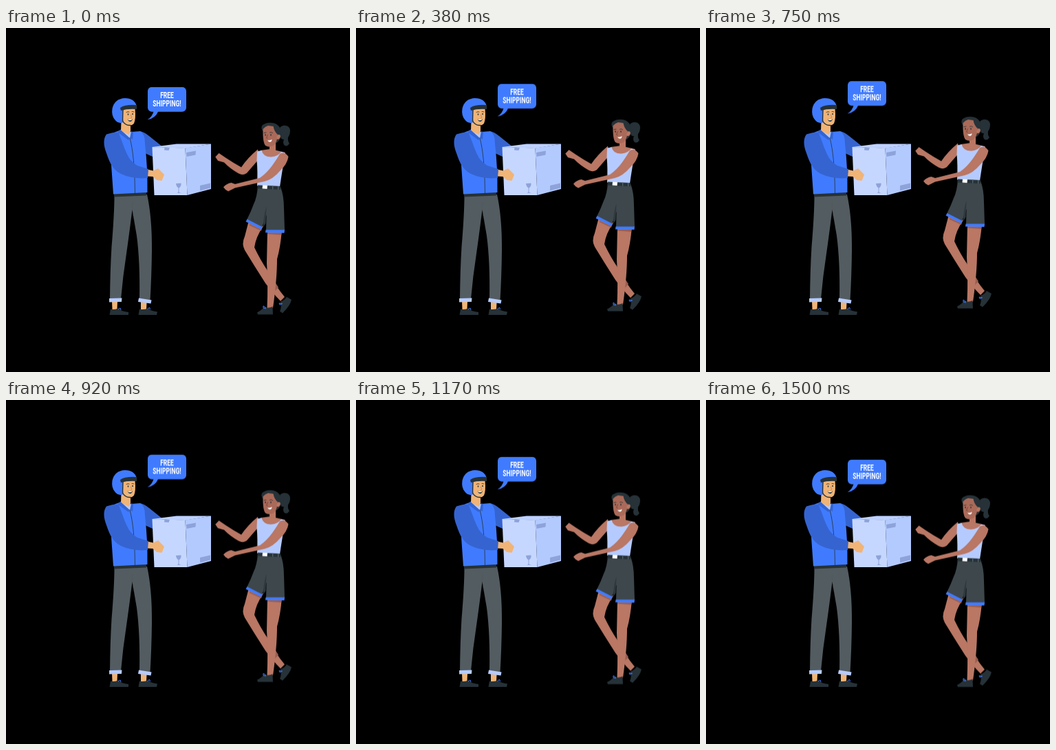
Animation, 500 px wide and 500 px high, one loop 1.54 s. Source, as an HTML page:

```html
<!DOCTYPE html>
<html lang="en">
<head>
<meta charset="utf-8">
<title>Free shipping</title>
<style>
  html, body { margin: 0; width: 100%; height: 100%; overflow: hidden; background: #000; }
  svg { display: block; width: 100vw; height: 100vh; }
  .float { animation: float 1540ms linear -49ms infinite; }
  @keyframes float {
    0%, 100% { transform: translateY(.7px); }
    50% { transform: translateY(-9.3px); }
  }
  .blue { fill: #407bff; }
  .navy { fill: #3564d1; }
  .dark { fill: #263238; }
  .pale { fill: #b5cbff; }
  .skin { fill: #f0b477; }
  .brown { fill: #b97764; }
  .face { fill: #aa6a59; }
  .shade { fill: #9a5e50; }
  .mark { fill: #8ea3da; }
  .line { fill: none; stroke: #263238; stroke-linecap: round; stroke-linejoin: round; }
  .lace { fill: none; stroke: #407bff; stroke-width: 1; }
  text { font: 700 12px Roboto, "Liberation Sans", sans-serif; fill: #fff; text-anchor: middle; }
</style>
</head>
<body>
<svg viewBox="0 0 500 500">
  <g id="courier">
    <!-- legs -->
    <path class="skin" d="M154 397h8l-.5 12h-7zM196 398l8.500 1-.5 10h-8z"/>
    <path fill="#535c61" d="M157.500 244L205 242C209.500 262 212.500 290 212 325Q211.500 362 209.500 396L194 393Q195 340 190 302L183.500 264Q179 300 175 328Q170 360 167 394L151 394Q151.500 350 153.500 318Q157.500 270 157.500 244Z"/>
    <path fill="#454d52" d="M183 251Q182.500 265 186 279L190 302L183.500 264Z"/>
    <path class="pale" d="M150 393L168.500 392.500 168 398 150 398.500ZM193 392.500L211.500 395.500 210.500 400.500 192 398Z"/>
    <path class="dark" d="M152 408.500Q157 410 163 407.500Q168 412 178 413V417H150.500ZM194 408.500Q200 410 206 407.500Q211 411.500 220 412.500L219 417H192.500Z"/>
    <path class="lace" d="M163 409l3-2 1 3M205.500 409l3-3 1 3"/>
    <path class="dark" d="M157 240L204 239V243.500L157 245.500Z"/>
    <!-- jacket -->
    <path class="navy" d="M194 150Q201 151 208 157L228 173 213 187 202 182Z"/>
    <path class="blue" d="M154 153L166 148.500 182 151 195 150Q202 153 202 168Q206 204 205.500 239L156 241.500Q153 199 151 170Z"/>
    <path class="pale" d="M166 149L182 151.500 183 154 180 161Z"/>
    <path class="skin" d="M167.500 136L181 141 181 150 179 155 167 149.500Z"/>
    <path class="navy" d="M166 147.500L180 160 178 163 162.500 151.500ZM182 150L185 151.500 184 162 180 160Z"/>
    <path class="line" stroke-width=".8" d="M180 160Q187 185 187.500 240"/>
  </g>

  <g id="helmet">
    <path class="skin" d="M168 117L187.500 117Q189 132 186 138.500Q182 143.500 174 141L168 136Z"/>
    <path class="blue" d="M171 137Q163 140 158 133Q153 127 154.500 117Q158 102.500 173 102Q187 102 190 114L171 118Q168 126 171 137Z"/>
    <path class="dark" d="M166 116Q173 111 189 112Q191 114 190 118Q177 117 167 120Z"/>
    <path class="line" stroke-width="1.400" d="M170 119L169.500 135Q173 142 181 141.500"/>
    <g class="dark"><ellipse cx="177.500" cy="125.500" rx=".8" ry="1.300"/><ellipse cx="184" cy="125" rx=".8" ry="1.300"/></g>
    <path class="line" stroke-width=".8" d="M175 122.500q2-1.500 4-.5M183 121.500q2-.5 3 .5"/>
    <path fill="none" stroke="#d58745" stroke-width=".9" d="M181 125.500l2 4.500-2 .5"/>
    <path class="dark" d="M176.500 132.500Q180 133.500 184 132Q183 136.300 180 136Q177.500 135.500 176.500 132.500Z"/>
    <path fill="#fff" d="M177 132.700Q180 133.500 183.500 132.300L183 133.500Q180 134.700 177.500 133.700Z"/>
  </g>

  <g id="box">
    <path fill="#bdd1ff" d="M212.500 173L248 168.500 298 168.500 260.500 175Z"/>
    <path fill="#c6d7ff" d="M212.500 173L260.500 174.500 263.500 243 215.500 243Z"/>
    <path fill="#b3caff" d="M260.500 174.500L298 168.500V234L263.500 243Z"/>
    <path class="mark" d="M230.500 173.500L238 173.700 236.500 178 230 177.500ZM262 181L276 178.500 275.500 184.500 262.500 187ZM282 229L297 225.500V232.500L282 236.500Z"/>
    <path class="mark" d="M247 226L254.500 225.500Q255 230 251.500 232.500V238.500L254.500 239.500 249 240 250.500 238V232.500Q247.500 230.500 247 226Z"/>
  </g>

  <g id="sleeve">
    <path class="skin" d="M205 205.500L214 207.500 221 204 230 213 226.500 222 219 221 213.500 216 205 215.500Z"/>
    <path class="navy" d="M146 154.500Q156 151 163.500 152C167.500 160 172 177 179 189Q184 196 191 200L207 205 206 218Q184 220 167 212C153 205 149 190 146 182Q139 164 146 154.500Z"/>
  </g>

  <g id="bubble" class="float">
    <rect class="blue" x="206" y="86" width="56" height="36" rx="6"/>
    <path class="blue" d="M215 120Q213 129 205.500 133.500Q217 132 221.500 121Z"/>
    <g transform="translate(234 0) scale(.71 1)">
      <text y="102.200">FREE</text>
      <text y="114.400">SHIPPING!</text>
    </g>
  </g>

  <g id="customer" class="float">
    <!-- back arm -->
    <path class="brown" d="M304.300 187.500L309.500 182 319 188.500Q331 196.500 342 202.500Q351 189 366 176.500L369 189Q356 204 350 211Q345 215 338 211.500Q325 204 317 195.500L308 193Z"/>
    <!-- legs -->
    <path class="brown" d="M353 280L374 288Q363 304 361 319Q370 338 381 354Q393 377 405 391L399 397Q388 386 377 371Q361 346 347 323Q342 314 347 303Z"/>
    <path class="shade" d="M354 285L371.500 293 371 295 354 287ZM390 368L396 377 389.500 384 388 383Z"/>
    <path class="brown" d="M380 294L401 294Q399 318 394 336Q394 365 388 407L379.500 407Q381 373 379 342Z"/>
    <path class="shade" d="M380 298H400.500L400 301 380 299.500Z"/>
    <path class="dark" d="M365 413.500Q372 410 375 405.500Q381 408 387.500 405L388 416.500H366ZM399 398Q405 396 408 391L415 395Q413 404 402 414.500L398 412Q401 405 399 398Z"/>
    <path class="lace" d="M378 407l-4-3 0 3 4 1M401 401l-4-1 1 2.500 4-2"/>
    <!-- shorts -->
    <path fill="#3d474c" d="M366 229L399 231Q404 244 404 262L405 295 378 295 378.500 272 372 290 350 279Q356 267 360 256Q365 246 366 229Z"/>
    <path fill="#2f393e" d="M378.500 260L377.500 284 374 289Q374 274 378.500 260Z"/>
    <path class="blue" d="M350.500 278L373 289.500 371.500 293 348.500 281.500ZM377.500 293.500H405L404.500 298 377 297.500Z"/>
    <!-- head -->
    <path class="dark" d="M398 145C403 139 413 142 413 149Q413 155 410 159Q409 164 412 168Q408 174 404 170Q402 166 404 162Q398 163 399 153Z"/>
    <path class="brown" d="M383 166L392 160 392 181 383 182Z"/>
    <path class="dark" d="M372.500 149Q370 144 373 141C381 135 396 137 399 147L399.500 159Q397 165 392 168L384 160Z"/>
    <path class="face" d="M373.500 147Q377 143 381 142L388.500 143Q390 151 395 155Q394 166 390 170Q383 175 377 171Q373 166 373.500 147Z"/>
    <ellipse class="brown" cx="396" cy="158.500" rx="2.500" ry="3.500" transform="rotate(25 396 158.500)"/>
    <g class="dark"><ellipse cx="377" cy="155.500" rx=".8" ry="1.300"/><ellipse cx="385" cy="155.500" rx=".8" ry="1.300"/></g>
    <path class="line" stroke-width=".8" d="M375 152.500l3-.5M383.500 152q2-1 4 .5"/>
    <path fill="none" stroke="#713f35" stroke-width=".8" d="M380.500 155l-2 5 2 .5"/>
    <path fill="#fff" d="M380 163.300Q383 164.200 386.500 162Q386.500 165.700 383.500 165.700Q381 165.500 380 163.300Z"/>
    <!-- top and front arm -->
    <path class="brown" d="M370 178L384 176 393 178 406 181 398 192 371 188Z"/>
    <path class="pale" d="M365 179.500L371.500 178Q374 188 386 187.500Q395 187 400 180L406 182Q401 210 398 231L365 229.500Q366 208 364.500 193Z"/>
    <path class="brown" d="M316 231.500Q320.500 226 327.500 225L333 227Q353 222 369 218Q379 211 387 200Q394 190 398 183Q405 179 410.500 187Q409 198 398 208Q388 220 376 223L333 232.500 323 237.500 319 235Z"/>
    <path class="dark" d="M366 228.500L399 230V235L365.500 233.500Z"/>
    <path fill="#fff" d="M373 228.500L380 229 379.500 234 372.500 233.500Z"/>
    <path fill="#56636a" d="M387 229.500h1.300v5H387zM395 230h1.300v5H395z"/>
  </g>
</svg>
</body>
</html>
```
